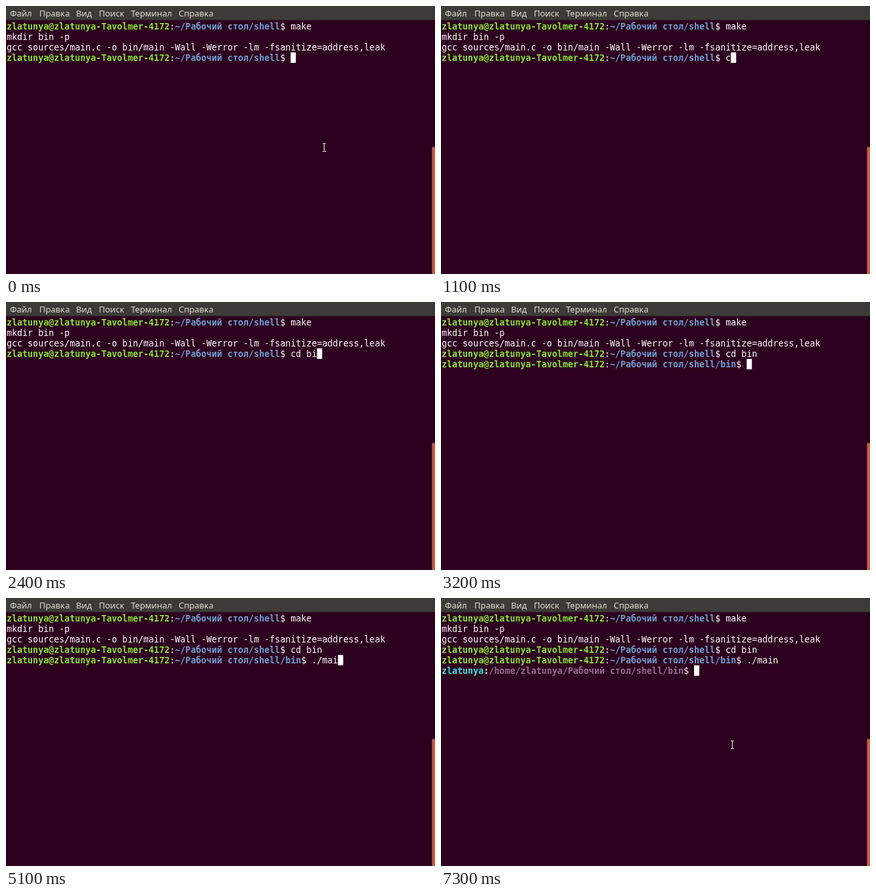
Animation, 656 px wide and 410 px high, one loop 7.4 s. Source, as an HTML page:

```html
<!DOCTYPE html>
<html lang="ru">
<head>
<meta charset="utf-8">
<title>Terminal</title>
<style>
  html, body { margin: 0; width: 100%; height: 100%; overflow: hidden; background: #2c001e; }
  svg { display: block; width: 656px; height: 410px; }
  text { white-space: pre; }
  .menu { font: 13px "Noto Sans", "Open Sans", sans-serif; fill: #dfdbd2; }
  .row { font: 13.36px "DejaVu Sans Mono", "Noto Sans Mono", monospace; fill: #fff; }
  .user, .path, .name, .home, .bold { font-weight: 700; }
  .user { fill: #8ae234; }
  .path { fill: #729fcf; }
  .name { fill: #34e2e2; }
  .home { fill: #946c92; }
</style>
</head>
<body>
<svg id="stage" viewBox="0 0 656 410">
  <rect width="656" height="410" fill="#2c001e"/>
  <rect width="656" height="21.5" fill="#3c3b37"/>
  <rect x="651.4" y="215.6" width="4.6" height="194.4" fill="#c65b48"/>
</svg>
<script>
const LOOP = 7400, STEP = 100;
const CELL = 8.043, LINE = 16.087, LEFT = 0.9, TOP = 22.9, BASE = 12.6;

const stage = document.getElementById("stage");

function add(tag, attrs, parent = stage) {
  const el = document.createElementNS("http://www.w3.org/2000/svg", tag);
  for (const key in attrs) el.setAttribute(key, attrs[key]);
  parent.append(el);
  return el;
}

const colX = col => LEFT + col * CELL;
const rowY = row => TOP + row * LINE;

// Each part is [text, class], placed on the character grid.
function addRow(row, parts) {
  const line = add("text", { class: "row", y: rowY(row) + BASE });
  let col = 0;
  for (const [text, cls = ""] of parts) {
    add("tspan", { x: colX(col), class: cls }, line).textContent = text;
    col += text.length;
  }
  return { line, col, last: line.lastChild };
}

const USER = "zlatunya";
const DIR = "Рабочий стол/shell";
const prompt = (dir, command) => [
  [`${USER}@${USER}-Tavolmer-4172`, "user"], [":"],
  [`~/${dir}`, "path"], ["$ "], [command]
];

const menu = [["Файл", 6], ["Правка", 51], ["Вид", 107], ["Поиск", 142], ["Терминал", 191], ["Справка", 264]];
for (const [label, x] of menu) add("text", { class: "menu", x, y: 16 }).textContent = label;

addRow(0, prompt(DIR, "make"));
addRow(1, [["mkdir bin -p"]]);
addRow(2, [["gcc sources/main.c -o bin/main -Wall -Werror -lm -fsanitize=address,leak"]]);

// Rows that take input: when they appear and when each key is pressed.
const inputs = [
  { row: 3, start: 0, parts: prompt(DIR, ""), command: "cd bin", keys: [1000, 1400, 1700, 2000, 2300, 2600] },
  { row: 4, start: 3000, parts: prompt(`${DIR}/bin`, ""), command: "./main", keys: [3600, 3900, 4400, 4700, 5000, 5300] },
  { row: 5, start: 5700, parts: [[USER, "name"], [":", "bold"], [`/home/${USER}/${DIR}/bin`, "home"], ["$ "], [""]], command: "", keys: [] }
];
for (const input of inputs) Object.assign(input, addRow(input.row, input.parts));

const cursor = add("rect", { width: 8, height: 16, fill: "#fff" });
const pointer = add("path", {
  d: "M-2.5 -6H-.7L0 -5.5L.7 -6H2.5M0 -5.5V5.5M-2.5 6H-.7L0 5.5L.7 6H2.5",
  fill: "none", stroke: "#eee6ec", "stroke-width": 1.1
});

const cursorOff = [[400, 1000], [6200, 6800]];
const POINTER_HIDE = 1000, POINTER_SHOW = 7000;

function draw(time) {
  const t = Math.floor(time % LOOP / STEP) * STEP;

  for (const input of inputs) {
    const visible = t >= input.start;
    input.line.setAttribute("visibility", visible ? "visible" : "hidden");
    const typed = input.keys.filter(key => key <= t).length;
    input.last.textContent = input.command.slice(0, typed);
    if (visible) {
      cursor.setAttribute("x", colX(input.col + typed));
      cursor.setAttribute("y", Math.round(rowY(input.row)));
    }
  }

  const off = cursorOff.some(([from, to]) => t >= from && t < to);
  cursor.setAttribute("visibility", off ? "hidden" : "visible");

  const hidden = t >= POINTER_HIDE && t < POINTER_SHOW;
  const move = Math.max(0, (t - POINTER_SHOW) / 300);
  pointer.setAttribute("visibility", hidden ? "hidden" : "visible");
  pointer.setAttribute("transform", `translate(${486.5 - 41 * move} ${216.5 + 8 * move})`);
}

const begin = performance.now();
function tick() {
  draw(performance.now() - begin);
  requestAnimationFrame(tick);
}
tick();
</script>
</body>
</html>
```
